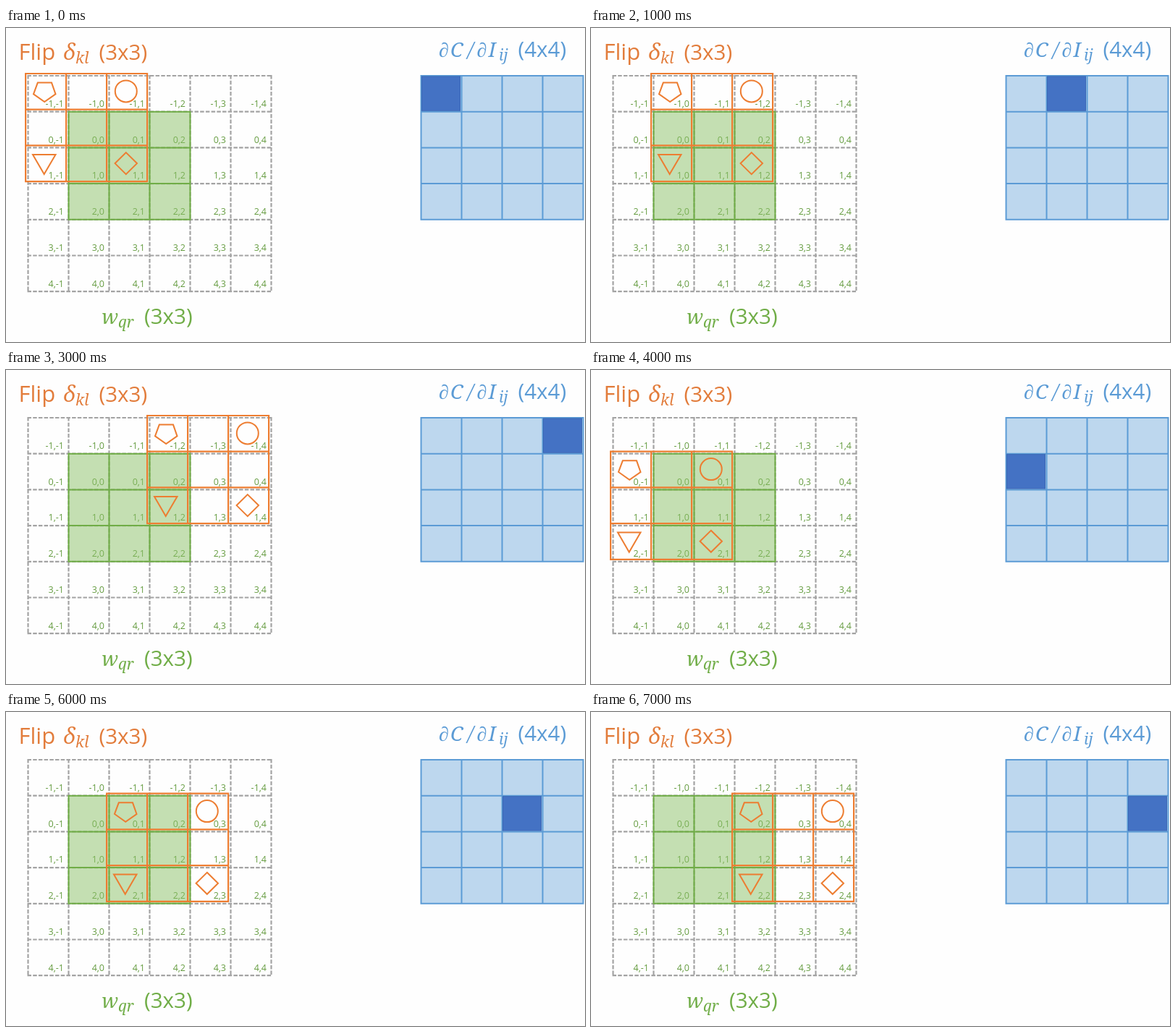
These frames come from a looping animation (800x434 px, 8000 ms). An HTML page:

```html
<!DOCTYPE html>
<html lang="en">
<head>
<meta charset="utf-8">
<title>Sliding a flipped kernel</title>
<style>
  html, body { margin: 0; width: 100%; height: 100%; overflow: hidden; background: #fefefe; }
  svg { display: block; width: 800px; height: 434px; }
  text { font-family: "Open Sans", "Noto Sans", sans-serif; stroke: none; }
  .title { font-size: 29.5px; }
  .math { font: italic 500 28px "Noto Serif", "Liberation Serif", serif; }
  .sub { font: italic 500 21px "Noto Serif", "Liberation Serif", serif; }
  .index { font-size: 12.5px; text-anchor: end; fill: #659c40; }
  path, circle { fill: none; }
</style>
</head>
<body>
<svg viewBox="0 0 800 434">
  <g fill="#e27c3b">
    <text class="title" x="17.5" y="43.5" style="font-size:31px">Flip</text>
    <text class="math" x="79" y="43.5" style="font-size:30px">δ</text>
    <text class="sub" x="96" y="49">kl</text>
    <text class="title" x="128.5" y="43.5">(3x3)</text>
  </g>
  <g fill="#5b9bd5">
    <text class="math" x="598" y="40">∂</text>
    <text class="math" x="614" y="40">C</text>
    <text class="math" x="638" y="40">/</text>
    <text class="math" x="650.5" y="40">∂</text>
    <text class="math" x="666.5" y="40">I</text>
    <text class="sub" x="681" y="45">ij</text>
    <text class="title" x="707.5" y="40">(4x4)</text>
  </g>
  <g fill="#70ad47">
    <text class="math" x="132" y="409">w</text>
    <text class="sub" x="155" y="414">qr</text>
    <text class="title" x="191" y="409">(3x3)</text>
  </g>

  <path id="padding" stroke="#a3a3a3" stroke-width="2.2" stroke-dasharray="5.5 2.2"/>
  <g id="indices"></g>
  <rect x="86.5" y="115.7" width="168" height="149.1" fill="#8bc169" opacity=".5"/>
  <path id="weights" stroke="#70ad47" stroke-width="2"/>

  <rect x="573.5" y="66" width="224" height="198.8" fill="#bdd7ee"/>
  <path id="output" stroke="#5b9bd5" stroke-width="2"/>
  <rect id="target" x="574.5" y="67" width="53" height="47.3" fill="#4472c4" stroke="#3a66b5"/>

  <g id="kernel" stroke="#ed7d31" stroke-width="2">
    <path id="cells" stroke-width="2.2"/>
    <path d="M43.8 75.6H63L68.5 91.3L53.2 102.1L38 91.3Z"/>
    <circle cx="165.8" cy="87.4" r="15"/>
    <path d="M37 174.9H68.5L52.7 202.1Z"/>
    <path d="M165.8 172.1L181 187.1L165.8 202.1L150.6 187.1Z"/>
  </g>
</svg>
<script>
const W = 56, H = 49.7, STEP = 1000, COLS = 4, STEPS = 8;
const el = id => document.getElementById(id);

function drawGrid(id, x, y, n) {
  let d = "";
  for (let i = 0; i <= n; i++) {
    d += `M${x - 1} ${y + i * H}h${n * W + 2}M${x + i * W} ${y - 1}v${n * H + 2}`;
  }
  el(id).setAttribute("d", d);
}

drawGrid("padding", 30.5, 66, 6);
drawGrid("weights", 86.5, 115.7, 3);
drawGrid("output", 573.5, 66, 4);
drawGrid("cells", 27.1, 63, 3);

let labels = "";
for (let r = 0; r < 6; r++) {
  for (let c = 0; c < 6; c++) {
    labels += `<text class="index" x="${80 + c * W}" y="${109 + r * H}">${r - 1},${c - 1}</text>`;
  }
}
el("indices").innerHTML = labels;

function render(now) {
  const step = Math.floor(now / STEP) % STEPS;
  const move = `translate(${step % COLS * W} ${Math.floor(step / COLS) * H})`;
  el("kernel").setAttribute("transform", move);
  el("target").setAttribute("transform", move);
  requestAnimationFrame(render);
}
render(performance.now());
</script>
</body>
</html>
```
